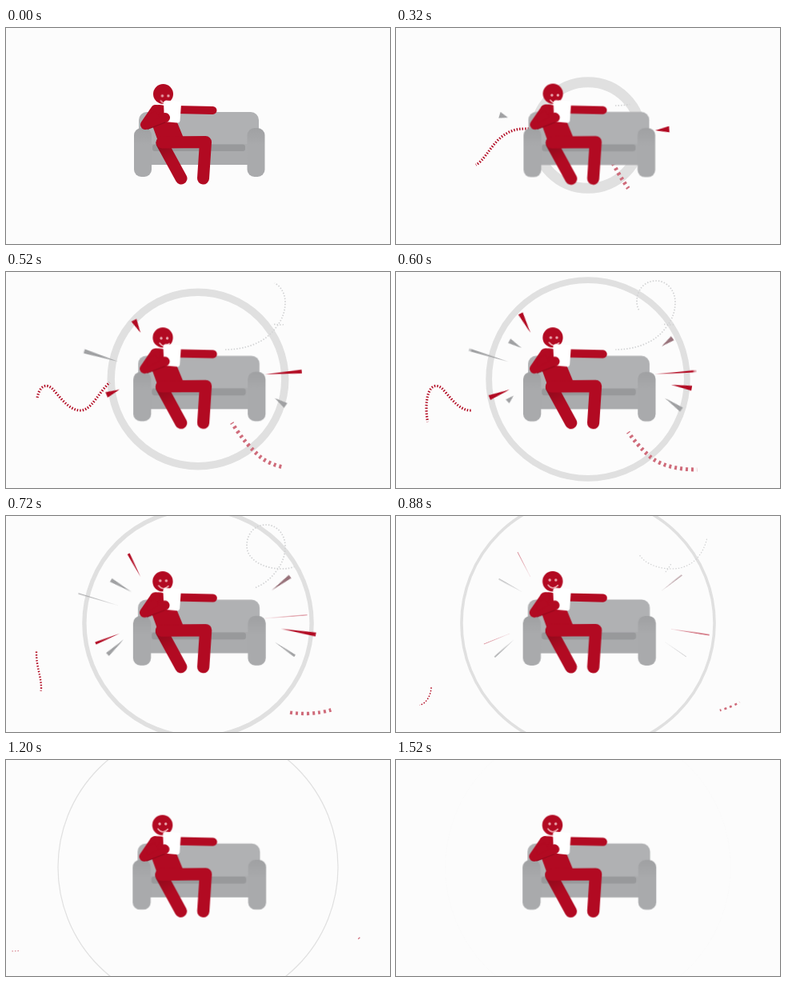
Recreate the animation shown at these times as an HTML page without scripts. Size 480 by 270 pixels, loop 1560 ms.

```html
<!DOCTYPE html>
<html lang="en">
<head>
<meta charset="utf-8">
<title>Relaxing on the sofa</title>
<style>
html, body { margin: 0; width: 100%; height: 100%; overflow: hidden; background: #fcfcfc; }
svg { display: block; width: 100vw; height: 100vh; }

.ring, .scene, .face, .trail, .window, .spike {
  animation: 1560ms linear infinite;
}
.ring { fill: none; stroke: #e0e0e0; animation-name: ring; }
.scene { transform-origin: 241px 135px; animation-name: push; animation-timing-function: ease-out; }
.face { animation-name: look; }

/* Dashed trails, each seen through a window that travels along its path */
.trail, .window { fill: none; }
.window { stroke: #fff; stroke-width: 12; }
.wave { stroke: #b20a22; stroke-dasharray: 1.5 2; animation-name: thin-wave; }
.loop { stroke: #d2d3d4; stroke-width: 1.6; stroke-dasharray: 1.5 2; animation-name: thin-loop; }
.swoop { stroke: #cf6b7a; stroke-dasharray: 3 4; animation-name: thin-swoop; }
.wave-window { animation-name: wave; }
.loop-window { animation-name: loop; }
.swoop-window { animation-name: swoop; }

/* --l: full length, --s: start in ms */
.spike { animation-name: shoot; animation-delay: calc((var(--s) - 1560) * 1ms); }
.late .spike { animation-name: shoot-late; }
.red { fill: #b20a22; }
.gray { fill: #a0a1a3; }
.mixed { fill: #98727a; }

.limb { fill: none; stroke: #b20a22; stroke-linecap: round; stroke-linejoin: round; }

@keyframes ring {
  0%, 5.1% { r: 0; stroke-width: 0; }
  5.2% { r: 1px; stroke-width: 16px; }
  12.82% { r: 35px; stroke-width: 15px; }
  20.51% { r: 66px; stroke-width: 13px; }
  28.21% { r: 93.5px; stroke-width: 11px; }
  38.46% { r: 123.7px; stroke-width: 7.8px; }
  46.15% { r: 142px; stroke-width: 5.4px; }
  56.41% { r: 158px; stroke-width: 3.6px; }
  66.67% { r: 168.5px; stroke-width: 2px; }
  76.92% { r: 175px; stroke-width: 1.2px; }
  89.74% { r: 178px; stroke-width: .4px; }
  100% { r: 178.5px; stroke-width: 0; }
}
@keyframes push { from { transform: none; } to { transform: scale(1.022); } }
@keyframes look {
  0%, 12% { transform: translate(2.4px, 3.8px); }
  28.21% { transform: translate(1.9px, 3px); }
  38.46% { transform: translate(1px, 1.7px); }
  46.15% { transform: translate(.4px, .7px); }
  56.41%, 100% { transform: none; }
}
@keyframes wave {
  0%, 7% { stroke-dasharray: 0 0 0 999; }
  17.95% { stroke-dasharray: 0 0 101 999; }
  28.21% { stroke-dasharray: 0 25 148 999; }
  38.46% { stroke-dasharray: 0 124 107 999; }
  46.15% { stroke-dasharray: 0 212 51 999; }
  56.41% { stroke-dasharray: 0 258 29 999; }
  76.92% { stroke-dasharray: 0 300 11 999; }
  89.74%, 100% { stroke-dasharray: 0 317 0 999; }
}
@keyframes loop {
  0%, 17.95% { stroke-dasharray: 0 0 0 999; }
  28.21% { stroke-dasharray: 0 0 71 999; }
  38.46% { stroke-dasharray: 0 0 194 999; }
  46.15% { stroke-dasharray: 0 36 220 999; }
  56.41% { stroke-dasharray: 0 194 109 999; }
  66.67% { stroke-dasharray: 0 285 32 999; }
  75%, 100% { stroke-dasharray: 0 321 0 999; }
}
@keyframes swoop {
  0%, 10.26% { stroke-dasharray: 0 0 0 999; }
  28.21% { stroke-dasharray: 0 30 71 999; }
  38.46% { stroke-dasharray: 0 57 104 999; }
  46.15% { stroke-dasharray: 0 138 54 999; }
  56.41% { stroke-dasharray: 0 190 27 999; }
  76.92% { stroke-dasharray: 0 230 6 999; }
  89.74%, 100% { stroke-dasharray: 0 245 0 999; }
}
@keyframes thin-wave {
  0%, 38.46% { stroke-width: 3.2px; }
  46.15% { stroke-width: 2.4px; }
  56.41% { stroke-width: 1.5px; }
  76.92% { stroke-width: .6px; }
  100% { stroke-width: 0; }
}
@keyframes thin-loop {
  0%, 46.15% { stroke-width: 1.7px; }
  56.41% { stroke-width: 1.2px; }
  75%, 100% { stroke-width: .4px; }
}
@keyframes thin-swoop {
  0%, 38.46% { stroke-width: 5px; }
  46.15% { stroke-width: 4.4px; }
  56.41% { stroke-width: 2.6px; }
  76.92% { stroke-width: 1.2px; }
  100% { stroke-width: 0; }
}
@keyframes shoot {
  0% { transform: scale(0, 8); }
  2.56% { transform: scale(calc(var(--l) * .24), 8); }
  12.82% { transform: scale(calc(var(--l) * .82), 6.3); }
  20.51% { transform: scale(calc(var(--l) * .98), 3.4); }
  30.77% { transform: scale(var(--l), .6); }
  32.05%, 100% { transform: scale(var(--l), 0); }
}
@keyframes shoot-late {
  0% { transform: scale(0, 7); }
  3.85% { transform: scale(calc(var(--l) * .55), 6.3); }
  11.54% { transform: scale(calc(var(--l) * .93), 5); }
  21.79% { transform: scale(var(--l), 1.2); }
  24.36%, 100% { transform: scale(var(--l), 0); }
}
</style>
</head>
<body>
<svg viewBox="0 0 480 270">
  <defs>
    <path id="tip" d="M0 0 1-.5V.5z"/>
    <path id="wave" pathLength="317" d="M200 118C180 124 172 126 160 126 120 126 114 173 93 173 78 173 66 154 57 145 46 137 38 148 38 170 38 190 44 200 44 215 43 226 37 236 27 237 18 239 9 239 0 239"/>
    <path id="loop" pathLength="321" d="M274 97C300 97 324 88 337 70 345 60 349 50 349 38 349 22 338 11 325 11 311 11 301 22 301 37 301 55 322 66 345 66 372 66 390 45 391 10"/>
    <path id="swoop" pathLength="245" d="M262 150C275 180 295 212 319 232 333 243 355 247 376 247 400 246 417 240 429 233 439 226 444 220 450 214"/>
    <mask id="wave-mask" maskUnits="userSpaceOnUse" x="0" y="0" width="480" height="270"><use href="#wave" class="window wave-window"/></mask>
    <mask id="loop-mask" maskUnits="userSpaceOnUse" x="0" y="0" width="480" height="270"><use href="#loop" class="window loop-window"/></mask>
    <mask id="swoop-mask" maskUnits="userSpaceOnUse" x="0" y="0" width="480" height="270"><use href="#swoop" class="window swoop-window"/></mask>
    <linearGradient id="arm" x2="0" y2="1">
      <stop stop-color="#a0a1a3"/><stop offset=".35" stop-color="#a9aaac"/>
    </linearGradient>
    <linearGradient id="shin" gradientUnits="userSpaceOnUse" x1="198" y1="144" x2="208" y2="166">
      <stop stop-color="#8f0a1c"/><stop offset="1" stop-color="#b20a22"/>
    </linearGradient>
  </defs>

  <circle class="ring" cx="240" cy="134"/>

  <g mask="url(#wave-mask)"><use href="#wave" class="trail wave"/></g>
  <g mask="url(#loop-mask)"><use href="#loop" class="trail loop"/></g>
  <g mask="url(#swoop-mask)"><use href="#swoop" class="trail swoop"/></g>

  <g style="--s:250">
    <g transform="translate(324 128) rotate(-4.6)" style="--l:50"><use href="#tip" class="spike red"/></g>
    <g transform="translate(140 112) rotate(-163)" style="--l:51;--s:285"><use href="#tip" class="spike gray"/></g>
  </g>
  <g style="--s:400">
    <g transform="translate(168 76) rotate(-117.3)" style="--l:33"><use href="#tip" class="spike red"/></g>
    <g transform="translate(142 147) rotate(158)" style="--l:33"><use href="#tip" class="spike red"/></g>
    <g transform="translate(336 157.5) rotate(34.7)" style="--l:31"><use href="#tip" class="spike gray"/></g>
  </g>
  <g class="late" style="--s:540">
    <g transform="translate(157 95) rotate(-150)" style="--l:32"><use href="#tip" class="spike gray"/></g>
    <g transform="translate(147 154.5) rotate(137)" style="--l:32;--s:565"><use href="#tip" class="spike gray"/></g>
    <g transform="translate(332 93) rotate(-37)" style="--l:31"><use href="#tip" class="spike mixed"/></g>
    <g transform="translate(344 141) rotate(9.3)" style="--l:47"><use href="#tip" class="spike red"/></g>
  </g>

  <g class="scene">
    <!-- Sofa -->
    <rect x="166" y="105" width="150" height="55" rx="10" fill="#b0b1b3"/>
    <rect x="176" y="145" width="132" height="26" fill="#aaabad"/>
    <rect x="183" y="145.500" width="116" height="8.500" rx="3" fill="#98999b"/>
    <rect x="160" y="125" width="22" height="61" rx="9" fill="url(#arm)"/>
    <rect x="301.500" y="125" width="22" height="61" rx="9" fill="url(#arm)"/>

    <!-- Person -->
    <path class="limb" d="M212 102 258.500 103" stroke-width="10"/>
    <path class="red" d="M182 99Q188 94 198 97H217L214 118 223 140 192 147 183 122Z"/>
    <path class="limb" d="M195 144 219 188" stroke-width="15" style="stroke:url(#shin)"/>
    <path class="limb" d="M195 143 249.500 142.500 246.500 188" stroke-width="15"/>
    <circle class="red" cx="196.500" cy="82.500" r="12.500"/>
    <g class="face">
      <g fill="#eba9b0"><circle cx="193" cy="81" r="1.700"/><circle cx="200.500" cy="81" r="1.700"/></g>
      <path d="M191 87Q196.500 94 203 87.500" fill="none" stroke="#eba9b0" stroke-width="1.600" stroke-linecap="round"/>
    </g>
    <path d="M200 90.500 217 92Q219.500 92.500 219 95L217.500 116Q217 119 214 118.500L198 117 197 93Q197.500 90.500 200 90.500Z" fill="#fff"/>
    <path class="limb" d="M187 102 174 121 199 112" stroke-width="12"/>
    <path d="M176 108 187 104 192 112 178 119Z" class="red"/>
    <path d="M177 126.500 199 118" fill="none" stroke="#930a1d" stroke-width="1"/>
  </g>
</svg>
</body>
</html>
```
